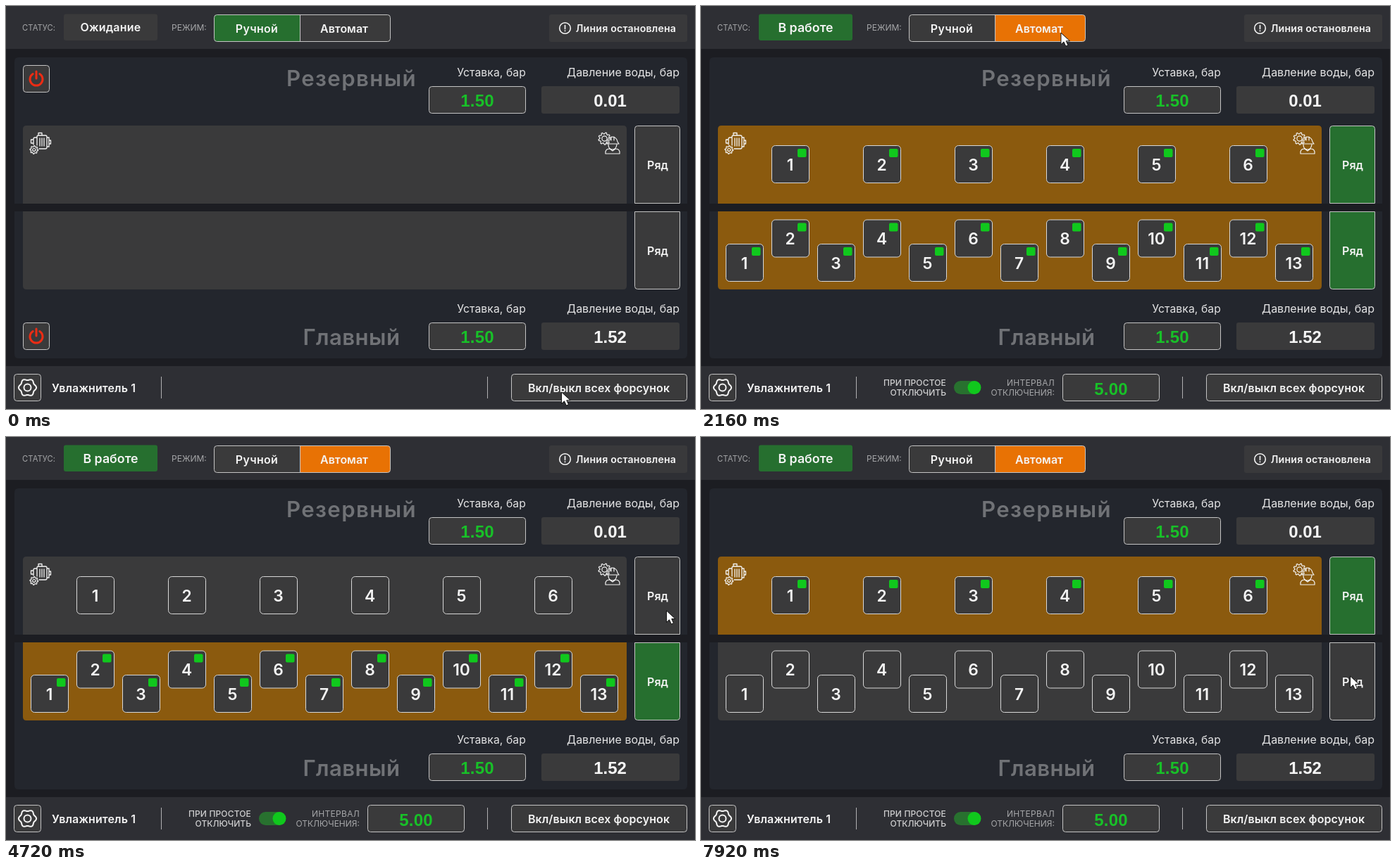
Write an HTML page that moves like this. It is 978x573 px and loops after 8 s.

```html
<!DOCTYPE html>
<html lang="ru">
<head>
<meta charset="utf-8">
<title>Панель увлажнителя</title>
<style>
html, body { margin: 0; width: 100%; height: 100%; overflow: hidden; background: #1c1d22; }
svg { display: block; width: 978px; height: 573px; }
text { font-family: Inter, "Open Sans", sans-serif; white-space: pre; }
text.num { font-family: "Liberation Sans", Arial, sans-serif; }
</style>
</head>
<body>
<svg id="stage" viewBox="0 0 978 573"></svg>
<script>
const NS = "http://www.w3.org/2000/svg";
const stage = document.getElementById("stage");
const C = {
  bar: "#2e2f34", panel: "#23262d", box: "#3a3a3b", line: "#c4c4c4", white: "#f4f4f4",
  green: "#266f2f", lime: "#10c81d", value: "#18c028", orange: "#e87204", brown: "#8b5a0e",
  title: "#707276", label: "#a5a6a8", red: "#ec2c14"
};

function el(tag, attrs, parent = stage) {
  const node = document.createElementNS(NS, tag);
  for (const k in attrs) node.setAttribute(k, attrs[k]);
  parent.appendChild(node);
  return node;
}

const group = (parent = stage) => el("g", {}, parent);

function rect(x, y, w, h, fill, rx = 0, stroke = "none", parent = stage) {
  return el("rect", { x, y, width: w, height: h, rx, fill, stroke }, parent);
}

const framed = (x, y, w, h, fill = C.box, parent = stage) =>
  rect(x + 0.5, y + 0.5, w - 1, h - 1, fill, 4, C.line, parent);

// Text is placed by the vertical centre of its capitals.
function text(str, x, cy, size, o = {}) {
  const node = el("text", {
    x, y: cy + size * 0.362, "font-size": size, "font-weight": o.weight || 600,
    "text-anchor": o.anchor || "middle", fill: o.fill || C.white,
    "letter-spacing": o.space || 0, class: o.num ? "num" : ""
  }, o.parent || stage);
  node.textContent = str;
  return node;
}

// Box with rounded corners at the top only, or at the bottom only.
function halfRound(x, y, w, h, r, top, fill, stroke = "none") {
  const d = top
    ? `M${x} ${y + h}V${y + r}q0 ${-r} ${r} ${-r}h${w - 2 * r}q${r} 0 ${r} ${r}V${y + h}z`
    : `M${x} ${y}V${y + h - r}q0 ${r} ${r} ${r}h${w - 2 * r}q${r} 0 ${r} ${-r}V${y}z`;
  return el("path", { d, fill, stroke });
}

function stroke(d, width = 1.2, color = C.white, parent = stage) {
  return el("path", {
    d, fill: "none", stroke: color, "stroke-width": width,
    "stroke-linecap": "round", "stroke-linejoin": "round"
  }, parent);
}

function ring(cx, cy, r, width = 1.2) {
  return el("circle", { cx, cy, r, fill: "none", stroke: C.white, "stroke-width": width });
}

// Closed outline whose radius depends on the step number.
function polar(cx, cy, steps, radius, width) {
  const pts = [];
  for (let i = 0; i < steps; i++) {
    const a = i / steps * 2 * Math.PI;
    const r = radius(i, a);
    pts.push((cx + r * Math.cos(a)).toFixed(2) + " " + (cy + r * Math.sin(a)).toFixed(2));
  }
  stroke("M" + pts.join("L") + "z", width);
}

const gear = (cx, cy, r, teeth, depth) =>
  polar(cx, cy, teeth * 4, i => i % 4 < 2 ? r : r - depth, 1.2);

const flower = (cx, cy, r, wave) =>
  polar(cx, cy, 72, (i, a) => r + wave * Math.cos(6 * a), 2);

// Header
rect(0, 0, 978, 61, C.bar);
text("СТАТУС:", 23, 31, 11.2, { anchor: "start", weight: 400, fill: C.label, space: 0.1 });
const status = rect(82, 11.5, 133, 37.5, C.box, 3);
const statusIdle = text("Ожидание", 148.5, 30.5, 16, { space: 0.2 });
const statusWork = text("В работе", 148.5, 31, 17.8);
text("РЕЖИМ:", 235, 31, 12, { anchor: "start", weight: 400, fill: C.label });
const manual = el("path", { d: "M417 12.5H299.5q-4 0-4 4V46.5q0 4 4 4H417z" });
const auto = el("path", { d: "M417 12.5H541.5q4 0 4 4V46.5q0 4-4 4H417z" });
framed(295, 12, 251, 39, "none");
el("path", { d: "M417.5 13V50", stroke: C.line });
text("Ручной", 356, 32, 16, { space: 0.3 });
text("Автомат", 480, 32, 16);
rect(771, 12, 196, 39, "#39393b", 3);
ring(793.5, 31.5, 7.8, 1.6);
stroke("M793.5 27.5v5M793.5 35.2v.2", 1.7);
text("Линия остановлена", 880, 32, 14.2, { space: 0.18 });

// Panels
halfRound(12, 73, 955, 208, 6, true, C.panel);
halfRound(12, 292, 955, 209, 6, false, C.panel);
const power = group();

function section(title, space, titleY, labelY, boxY, powerY, pressure) {
  text(title, 490.5, titleY, 31.2, { fill: C.title, space });
  text("Уставка, бар", 738, labelY, 15.7, { anchor: "end", weight: 400, fill: "#e4e4e5", space: 0.1 });
  text("Давление воды, бар", 956, labelY, 16, { anchor: "end", weight: 400, fill: "#e4e4e5" });
  framed(600, boxY, 138, 39);
  text("1.50", 669, boxY + 20, 24, { num: true, weight: 700, fill: C.value, space: 0.2 });
  rect(760, boxY, 196, 39, C.box, 3);
  text(pressure, 857.5, boxY + 20, 24, { num: true, weight: 700 });

  framed(24, powerY, 38, 39, C.box, power);
  stroke(`M38.2 ${powerY + 12.5}a9 9 0 1 0 9.6 0M43 ${powerY + 9}v10`, 3, C.red, power);
}
section("Резервный", 1.4, 103, 94, 114, 84, "0.01");
section("Главный", 0.4, 471, 430, 450, 450, "1.52");

function makeRow(y, top, count, place) {
  const bed = halfRound(24, y, 857, 111, 5, top, C.box);
  const button = halfRound(892.5, y + 0.5, 64, 110, 4, top, C.box, C.line);
  text("Ряд", 925, top ? 226 : 348, 16);
  const nozzles = group();
  const lamps = group();
  for (let i = 0; i < count; i++) {
    const [nx, ny] = place(i);
    rect(nx + 0.5, ny + 0.5, 53, 53, C.box, 5, "#d8d8d8", nozzles);
    text(String(i + 1), nx + 26.5, ny + 27.5, 22.8, { parent: nozzles });
    rect(nx + 37, ny + 5, 12.5, 12, C.lime, 2, "none", lamps);
  }
  return (visible, on) => {
    bed.setAttribute("fill", on ? C.brown : C.box);
    button.setAttribute("fill", on ? C.green : C.box);
    show(nozzles, visible);
    show(lamps, visible && on);
  };
}
const reserveRow = makeRow(170, true, 6, i => [100 + 130 * i, 198]);
const mainRow = makeRow(292, false, 13, i => [35 + 65 * i, i % 2 ? 303.5 : 338]);

// Motor icon
stroke("M44 198V186q0-2 2-2h10q2 0 2 2V201q0 2-2 2H47M46 184v-3.5h5v3.5" +
  "M44 187h-3q-2 0-2 2V197M39 190h-3.5v5H39M58 187h3v13h-3M61 191h2.5v5H61" +
  "M48 188v11M51 188v11M54 188v11", 1.3);
gear(39.8, 204.5, 5.8, 8, 1.4);
ring(39.8, 204.5, 2);

// Worker icon
gear(849.5, 188.5, 8.6, 9, 2);
ring(849.5, 188.5, 3.6);
stroke("M853 196v-3q1-6 8-7q6 1 7 7l2 3zM859 186v5M863 186v5" +
  "M855 197q0 7 6 7q5 0 6-7M851 210v-3q1-4 6-4l4 3l4-3q5 0 6 4v3z");

// Footer
rect(0, 512, 978, 61, C.bar);
framed(11, 523, 39, 39);
flower(30.5, 542.5, 11.5, 1.1);
ring(30.5, 542.5, 5, 2);
text("Увлажнитель 1", 65, 543, 16, { anchor: "start", space: 0.1 });
el("path", { d: "M220.5 527V558M683.5 527V558", stroke: "#b0b0b2" });
framed(717, 523, 250, 39);
text("Вкл/выкл всех форсунок", 841.5, 543, 16, { space: 0.1 });

const idle = group();
const idleText = (str, x, y, fill, weight, space) =>
  text(str, x, y, 12, { anchor: "end", fill, weight, space, parent: idle });
idleText("ПРИ ПРОСТОЕ", 348, 536, "#d0d0d1", 500, 0.15);
idleText("ОТКЛЮЧИТЬ", 348, 550, "#d0d0d1", 500, 0);
idleText("ИНТЕРВАЛ", 502, 536, C.label, 400, 0.3);
idleText("ОТКЛЮЧЕНИЯ:", 502, 550, C.label, 400, 0);
rect(359, 533, 38, 19, "#28712f", 9.5, "none", idle);
el("circle", { cx: 388, cy: 542.5, r: 9.5, fill: C.lime }, idle);
framed(513, 523, 138, 39, C.box, idle);
text("5.00", 582, 544, 24, { num: true, weight: 700, fill: C.value, space: 0.2, parent: idle });

const cursor = el("path", {
  d: "M0 0V16.5L4 12.8L6.8 19L10 17.6L7.3 11.6H12.6z",
  fill: "#fff", stroke: "#111", "stroke-width": 1
});

// Pointer stops: time, x, y
const stops = [
  [0, 788.5, 549], [100, 788.5, 549], [960, 513.5, 35.5], [2100, 513.5, 35.5],
  [2880, 362.5, 193], [3280, 362.5, 193], [4080, 937.5, 247], [6320, 937.5, 247],
  [6640, 916.5, 349], [6960, 916.5, 349], [7280, 921.5, 340], [8000, 921.5, 340]
];

function pointer(t) {
  const i = stops.findIndex(s => s[0] > t);
  const [t0, x0, y0] = stops[i - 1];
  const [t1, x1, y1] = stops[i];
  const u = (t - t0) / (t1 - t0);
  const e = u * u * (3 - 2 * u);
  return [x0 + (x1 - x0) * e, y0 + (y1 - y0) * e];
}

function show(node, on) {
  node.setAttribute("visibility", on ? "visible" : "hidden");
}

const LOOP = 8000, STEP = 80;

function draw(t) {
  const running = t >= 1280;
  const reserveOn = running && !(t >= 4320 && t < 6320);
  const mainOn = running && t < 7440;
  status.setAttribute("fill", running ? C.green : C.box);
  show(statusIdle, !running);
  show(statusWork, running);
  manual.setAttribute("fill", running ? C.box : C.green);
  auto.setAttribute("fill", running ? C.orange : C.box);
  show(power, !running);
  show(idle, running);
  reserveRow(running, reserveOn);
  mainRow(running, mainOn);
  cursor.setAttribute("transform", `translate(${pointer(t)})`);
}

const start = performance.now();
function tick() {
  const t = (performance.now() - start) % LOOP;
  draw(Math.floor(t / STEP) * STEP);
  requestAnimationFrame(tick);
}
tick();
</script>
</body>
</html>
```
